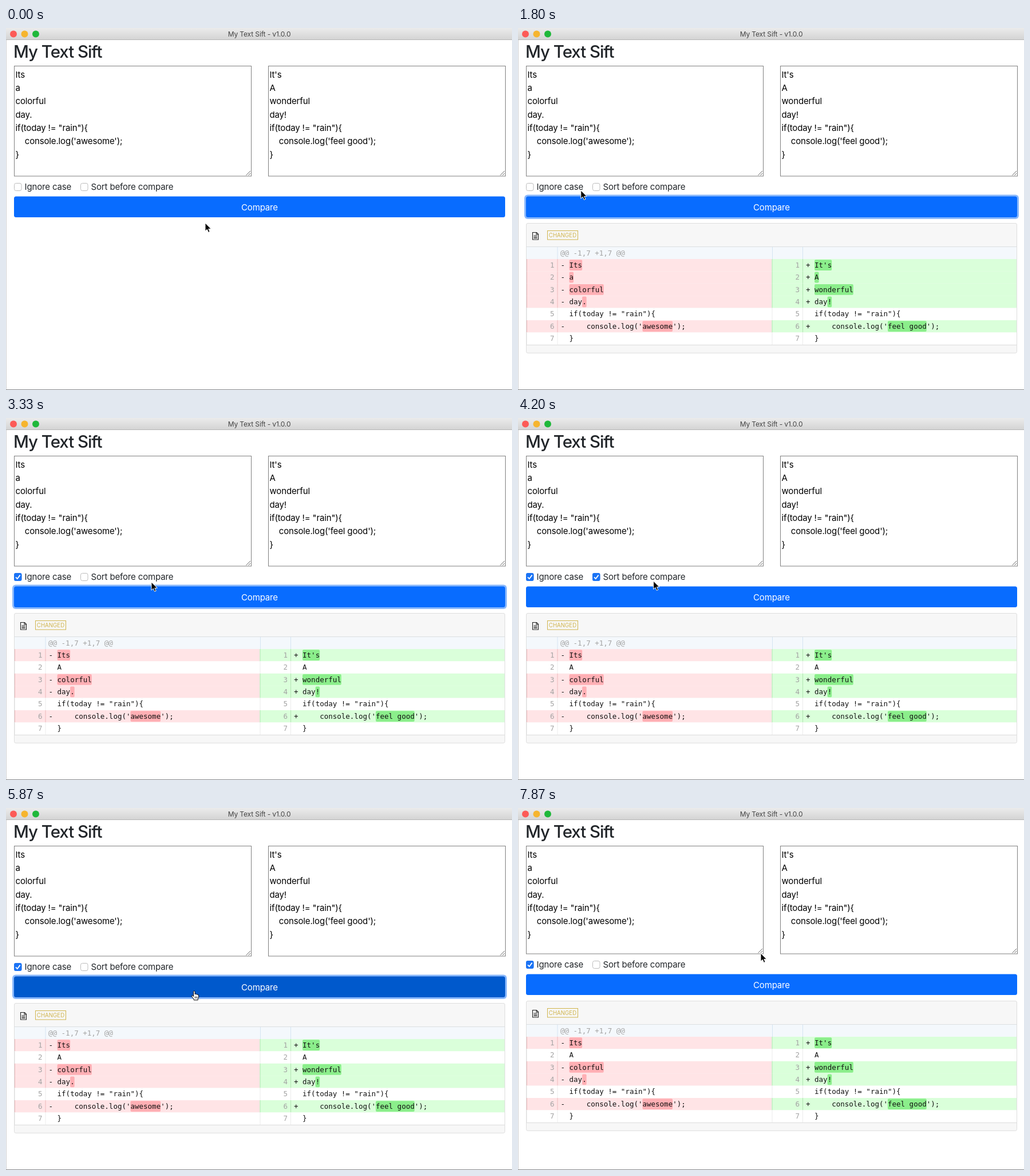
Write an HTML page that moves like this. It is 884 px wide and 633 px high and loops after 8.07 s.

```html
<!DOCTYPE html>
<html lang="en">
<head>
<meta charset="utf-8">
<title>My Text Sift</title>
<style>
  html, body { margin: 0; width: 100%; height: 100%; overflow: hidden; background: #fff; }
  svg { display: block; width: 884px; height: 633px; }
  text { font: 15px Inter, "Liberation Sans", sans-serif; letter-spacing: -.01em; white-space: pre; }
  .code text { font: 12.5px "DejaVu Sans Mono", monospace; letter-spacing: 0; }
</style>
</head>
<body>
<svg id="stage" viewBox="0 0 884 633">
  <defs>
    <linearGradient id="bar" x2="0" y2="1">
      <stop stop-color="#ebebeb"/><stop offset="1" stop-color="#d3d3d3"/>
    </linearGradient>
  </defs>
  <rect width="884" height="633" fill="#fff"/>
  <rect width="884" height="21" fill="url(#bar)"/>
  <path d="M0 20.5H884" stroke="#b5b5b5"/>
  <path d="M0 632.5H884" stroke="#85868a"/>
  <path d="M.5 21V632" stroke="#d2d2d4"/>
  <circle cx="13" cy="10.5" r="6" fill="#fc5b57"/>
  <circle cx="32.5" cy="10.5" r="6" fill="#f6b52e"/>
  <circle cx="52" cy="10.5" r="6" fill="#1fb83a"/>
  <text x="442.5" y="15" text-anchor="middle" fill="#444" style="font-size:12px">My Text Sift - v1.0.0</text>
  <text x="13" y="51.5" fill="#212529" style="font-size:29.5px;font-weight:500;letter-spacing:-.036em">My Text Sift</text>
  <g id="areas"></g>
  <g id="lower">
    <g id="checks"></g>
    <rect id="ring" x="11" y="291.5" width="864" height="42.5" rx="6" fill="#89b8fc"/>
    <rect id="button" x="14" y="294.5" width="858" height="36.5" rx="3.5"/>
    <text x="443" y="318.7" text-anchor="middle" fill="#fff">Compare</text>
    <g id="results"></g>
  </g>
  <path id="arrow" d="M0 0V14.2L3.3 11.2L5.6 16.4L8.1 15.3L5.8 10.3H10.3Z" fill="#000" stroke="#fff" stroke-width="1"/>
  <g id="hand" stroke="#000" stroke-width="1" stroke-linejoin="round">
    <path d="M-1.6 9.5V1.3Q-1.6 0 -.3 0T1.1 1.3V5.6Q2.4 4.5 3.6 5.9Q5 5.2 5.9 6.6Q7.6 6.2 7.6 8.2V11L6.3 13.6V15.8H-.9V14.2L-4.6 9.5Q-5.3 7.8 -3.6 7.7Z" fill="#fff"/>
    <path d="M1.2 9.5V13M3.1 9.5V13M5 9.5V13" stroke-width=".7"/>
  </g>
</svg>
<script>
const LOOP = 8070, FPS = 15;
const $ = id => document.getElementById(id);
const esc = s => s.replace(/&/g, '&amp;').replace(/</g, '&lt;');
const rect = (x, y, w, h, fill, extra = '') =>
  `<rect x="${x}" y="${y}" width="${w}" height="${h}" fill="${fill}" ${extra}/>`;
const label = (x, y, s, fill, extra = '') =>
  `<text x="${x}" y="${y}" fill="${fill}" ${extra}>${esc(s)}</text>`;
const line = (d, stroke, w = 1) => `<path d="${d}" fill="none" stroke="${stroke}" stroke-width="${w}"/>`;

// Text areas
const inputs = [
  [14, ['Its', 'a', 'colorful', 'day.', 'if(today != "rain"){', "    console.log('awesome');", '}']],
  [458, ["It's", 'A', 'wonderful', 'day!', 'if(today != "rain"){', "    console.log('feel good');", '}']]
];
$('areas').innerHTML = inputs.map(([x, lines]) =>
  rect(x + .5, 66.5, 414, 192.5, '#fff', 'class="box" stroke="#808080"') +
  lines.map((s, i) => label(x + 2.5, 86.5 + 23.35 * i, s, '#000')).join('') +
  `<g class="grip">${line(`M${x + 405.5} 257.5l7.5 -7.5M${x + 409.5} 257.5l3.5 -3.5`, '#555', .9)}</g>`
).join('');

// Checkboxes
const options = [['ignore', 14, 'Ignore case'], ['sort', 130, 'Sort before compare']];
$('checks').innerHTML = options.map(([id, x, s]) =>
  rect(x + .5, 271.5, 12.5, 13, '#fff', 'rx="3" stroke="#bcbcbc"') +
  `<g id="${id}">${rect(x, 271, 13.5, 14, '#1a73f5', 'rx="3"')}${line(`M${x + 3} 278.3l2.8 2.9l4.8 -6.6`, '#fff', 1.8)}</g>` +
  label(x + 18.5, 283, s, '#212529')
).join('');

// Diff rows: sign, then text with ~marked~ parts; null is a filler row
const common = ' if(today != "rain"){', brace = ' }';
const logOld = "-    console.log('~awesome~');", logNew = "+    console.log('~feel good~');";
const rowsFor = second => [
  ['-~Its~', "+~It's~"], second, ['-~colorful~', '+~wonderful~'], ['-day~.~', '+day~!~'],
  [common, common], [logOld, logNew], [brace, brace]
];
const diffs = [
  rowsFor(['-~a~', '+~A~']),
  rowsFor([' A', ' A']),
  [[logOld, logNew], ['-Its', null], [' A', ' A'], ['-~colorful~', "+~It's~"], ['-day~.~', '+day~!~'],
    [common, common], [null, '+wonderful'], [brace, brace]]
];
const ROW = 21.4, TOP = 404, CHAR = 7.525;
const tones = {
  '-': { row: '#ffe4e6', mark: '#ffafb4', edge: '#edb9bb' },
  '+': { row: '#daffda', mark: '#8bee8b', edge: '#b2e3b2' },
  ' ': { row: '#fff', edge: '#ececec' }
};

function cell(src, x, y, w, num) {
  if (src === null) return rect(x, y, w, ROW, '#f0eff0');
  const sign = src[0], tone = tones[sign], textX = x + 59.5;
  let col = 2, out = rect(x, y, w, ROW, tone.row) +
    line(`M${x + .5} ${y}v${ROW}M${x + 54} ${y}v${ROW}`, tone.edge);
  const parts = src.slice(1).split('~');
  parts.forEach((part, i) => {
    if (i % 2) out += rect(textX + col * CHAR, y + 1.2, part.length * CHAR, 18.8, tone.mark, 'rx="2"');
    col += part.length;
  });
  return out + label(x + 48.5, y + 14.8, String(num), '#a3a3a3', 'text-anchor="end"') +
    label(textX, y + 14.8, sign + ' ' + parts.join(''), '#111');
}

function panel(rows) {
  const end = TOP + rows.length * ROW, nums = [0, 0];
  let out = rect(14.5, 341.5, 857, end + 14.5 - 341.5, '#f7f7f7', 'rx="2.5" stroke="#dedede"') +
    line('M25.5 357.5h7l3 3v9.5h-10zM32 357.5v3.5h3.5M27.5 363h6M27.5 365.2h6M27.5 367.4h6', '#222', 1.1) +
    rect(51.5, 354.5, 53, 15.5, 'none', 'stroke="#d0b44c"') +
    `<text x="78" y="365.6" text-anchor="middle" fill="#d0b44c" style="font:9.7px Inter,sans-serif">CHANGED</text>` +
    rect(15, 382.5, 856, 21.5, '#f4f8fc') +
    line('M15 382.5H871', '#dcdfe2') +
    line('M69 383v21M444.5 383v21M497.5 383v21', '#d5e4f2') +
    label(74, 397.5, '@@ -1,7 +1,7 @@', '#a3a3a3');
  rows.forEach((pair, r) => pair.forEach((src, side) => {
    if (src !== null) nums[side]++;
    out += cell(src, side ? 443.5 : 15, TOP + r * ROW, side ? 427.5 : 428, nums[side]);
  }));
  return out + line(`M15 ${end + .5}H871`, '#dddddd');
}
$('results').innerHTML = diffs.map(d => `<g class="code">${panel(d)}</g>`).join('');
const panels = [...document.querySelectorAll('.code')];

// Timeline: pointer path [ms, x, y] and stepped states [ms, value]
const path = [
  [0, 348, 341], [330, 357, 320], [1270, 357, 320], [1930, 82, 280],
  [2130, 82, 280], [2440, 264, 307], [2530, 264, 309], [3070, 264, 309], [3330, 254, 287], [3860, 234, 281],
  [4130, 234, 281], [4400, 250, 306], [4590, 254, 304], [4730, 267, 285.5], [4930, 260, 281],
  [5130, 260, 281], [5530, 329, 320], [5900, 329, 320], [6330, 423, 264],
  [6400, 423, 264], [6600, 423, 258], [6930, 423, 258], [7270, 424, 254]
];
const tracks = {
  ignore: [[0, false], [2100, true]],
  sort: [[0, false], [3900, true], [5100, false]],
  ring: [[0, false], [730, true], [2060, false], [2670, true], [3900, false], [4460, true], [5100, false], [5730, true], [7000, false]],
  diff: [[0, -1], [860, 0], [2800, 1], [4560, 2], [5800, 1]]
};
// Button shade: 0 rest, 1 hover, 2 pressed
const shades = [[0, 0], [200, 1], [720, 2], [940, 1], [1640, 0], [2270, 1], [2670, 2], [2840, 1],
  [3190, 0], [4300, 1], [4450, 2], [4570, 1], [4670, 0], [5240, 1], [5710, 2], [5890, 1], [6070, 0]];
const colors = [[8, 108, 255], [0, 96, 221], [0, 89, 204]];

const stepAt = (keys, t) => keys.filter(k => k[0] <= t).pop();
const mix = (a, b, p) => a + (b - a) * p;
const clamp = v => Math.max(0, Math.min(1, v));

function pointerAt(t) {
  const i = path.findIndex(k => k[0] > t);
  if (i < 0) return path[path.length - 1].slice(1);
  const [t0, x0, y0] = path[i - 1], [t1, x1, y1] = path[i];
  const p = (t - t0) / (t1 - t0), e = p * p * (3 - 2 * p);
  return [mix(x0, x1, e), mix(y0, y1, e)];
}

function buttonColor(t) {
  const now = stepAt(shades, t), i = shades.indexOf(now);
  const from = colors[shades[Math.max(0, i - 1)][1]], to = colors[now[1]];
  const p = clamp((t - now[0]) / 110);
  return `rgb(${from.map((c, j) => Math.round(mix(c, to[j], p)))})`;
}

const show = (el, on) => el.setAttribute('visibility', on ? 'visible' : 'hidden');
const move = (el, x, y) => el.setAttribute('transform', `translate(${x} ${y})`);

function render(ms) {
  const t = Math.floor(((ms % LOOP) + 5) * FPS / 1000) * 1000 / FPS;
  const lift = -Math.round(4 * clamp((t - 6940) / 320));
  for (const id of ['ignore', 'sort', 'ring']) show($(id), stepAt(tracks[id], t)[1]);
  const current = stepAt(tracks.diff, t)[1];
  panels.forEach((p, i) => show(p, i === current));
  $('button').setAttribute('fill', buttonColor(t));
  document.querySelectorAll('.box').forEach(b => b.setAttribute('height', 192.5 + lift));
  document.querySelectorAll('.grip').forEach(g => move(g, 0, lift));
  move($('lower'), 0, lift);
  const [x, y] = pointerAt(t), over = y > 294 && y < 331;
  show($('hand'), over);
  show($('arrow'), !over);
  move($(over ? 'hand' : 'arrow'), x, y);
}

const start = performance.now();
function tick() {
  render(performance.now() - start);
  requestAnimationFrame(tick);
}
tick();
</script>
</body>
</html>
```
